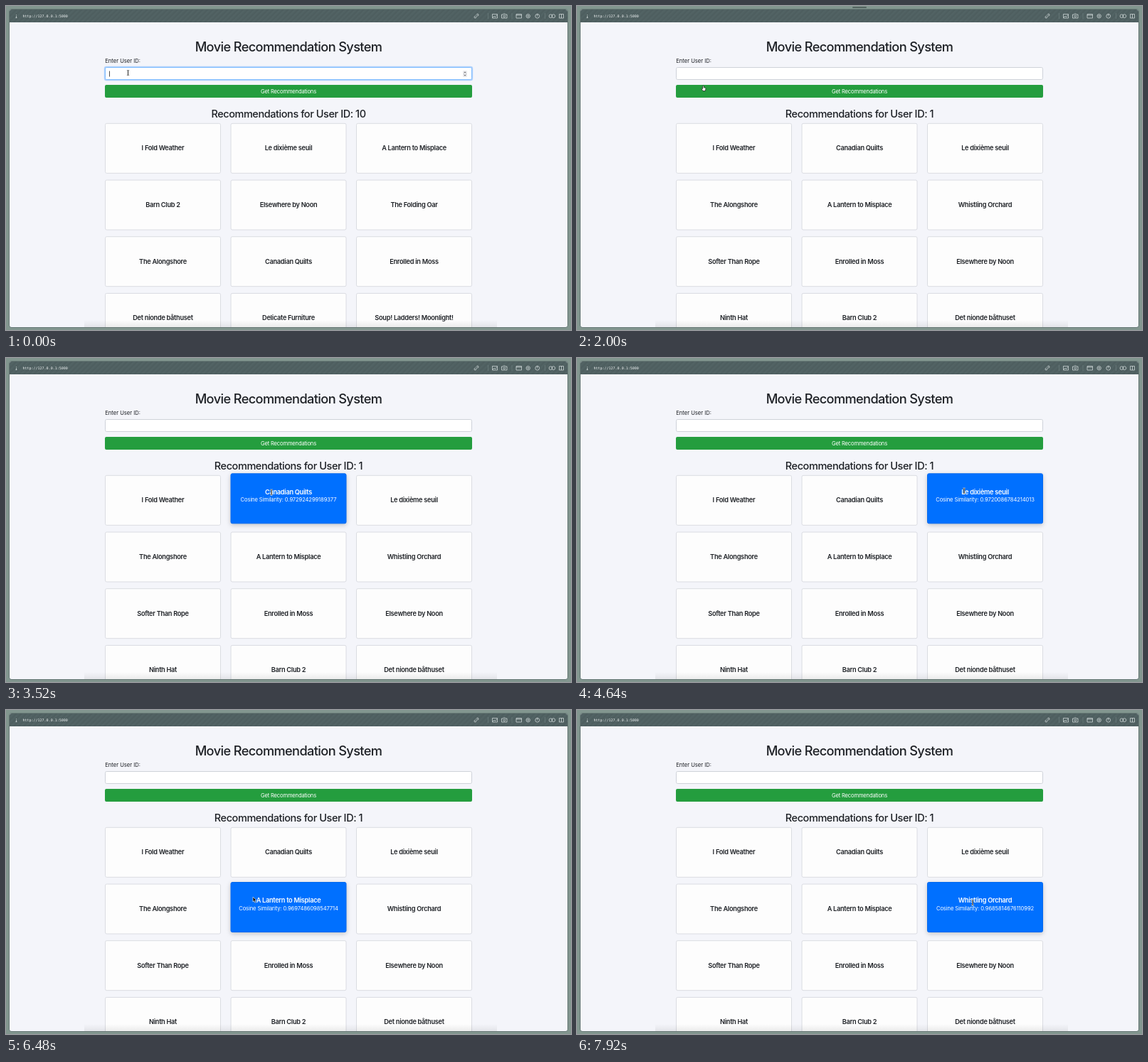
Recreate the animation shown at these times as an HTML page. Size 794 px wide and 456 px high, loop 8 s.

```html
<!DOCTYPE html>
<html lang="en">
<head>
<meta charset="utf-8">
<title>Movie Recommendation System</title>
<style>
html, body { margin: 0; width: 100%; height: 100%; overflow: hidden; background: #82968f; }
svg { display: block; width: 794px; height: 456px; }
text { font: 400 7.6px Inter, "Open Sans", sans-serif; fill: #1d2025; white-space: pre; }
.mid { text-anchor: middle; }
.h1 { font-size: 18.2px; font-weight: 500; letter-spacing: -.034em; }
.h2 { font-size: 14.5px; font-weight: 500; letter-spacing: -.03em; }
.card { font-size: 9.2px; font-weight: 600; letter-spacing: -.03em; }
.sim { letter-spacing: -.014em; }
.button { letter-spacing: -.023em; }
.white { fill: #fff; }
.url { font: 5px "DejaVu Sans Mono", monospace; fill: #f0f3f3; }
.icons { fill: none; stroke: #dfe6e5; stroke-width: .7; }
.lift { filter: drop-shadow(0 2px 3px rgba(0, 0, 0, .2)); }
</style>
</head>
<body>
<svg viewBox="0 0 794 456">
  <defs>
    <pattern id="stripes" width="5" height="5" patternUnits="userSpaceOnUse" patternTransform="rotate(45)">
      <rect width="5" height="5" fill="#4e5e5f"/><rect width="2.5" height="5" fill="#526364"/>
    </pattern>
    <linearGradient id="fade" x2="0" y2="1">
      <stop stop-opacity="0"/><stop offset="1" stop-opacity=".07"/>
    </linearGradient>
    <clipPath id="window"><rect x="5" y="5" width="784" height="447" rx="3"/></clipPath>
  </defs>
  <rect width="794" height="456" fill="#82968f"/>
  <rect x="4.5" y="4.5" width="785" height="448" rx="3.5" fill="none" stroke="#647673"/>
  <g clip-path="url(#window)">
    <rect x="5" y="5" width="784" height="447" fill="#f4f5fa"/>
    <rect x="5" y="5" width="784" height="18" fill="url(#stripes)"/>
    <text class="url" x="23.5" y="15.8">http://127.0.0.1:5000</text>
    <g class="icons">
      <path d="M14.5 12.2v.8m0 .8v3M13.5 16.6h2"/>
      <path d="M660 15.6l3-3M660.6 12.6l1.2-1.2q2-1 2.4 1.4l-1.4 1.6M661.4 15.6l-1.4 1.4q-2 .6-2-1.8l1.6-1.6"/>
      <path d="M677.5 10v8M711 10v8M757.5 10v8" stroke="#6f8080"/>
      <path d="M683.5 11.5h7v5.5h-7zM684 16l2-2 1.5 1.5 2.5-3M696.5 12h2l.8-1h2l.8 1h1.9v5h-7.5z"/>
      <circle cx="700.3" cy="14.3" r="1.4"/>
      <path d="M717 11.5h7.5v5.5h-7.5zM717 13h7.5"/>
      <circle cx="733.7" cy="14.2" r="2.7"/><circle cx="733.7" cy="14.2" r="1"/>
      <circle cx="746.7" cy="14.2" r="2.9"/><path d="M746.7 11v3.5"/>
      <circle cx="765.5" cy="14.2" r="2.4"/><circle cx="769.3" cy="14.2" r="2.4"/>
      <path d="M777.5 11.5h6v5.5h-6zM780.5 11.5v5.5"/>
    </g>
    <text class="h1 mid" x="397" y="63.5">Movie Recommendation System</text>
    <text x="139.3" y="79.7">Enter User ID:</text>
    <g id="page"></g>
    <rect x="110" y="442" width="580" height="10" fill="url(#fade)"/>
  </g>
  <g id="overlay"></g>
</svg>
<script>
const LOOP = 8000, SUBMIT = 1520;
const page = document.getElementById('page'), overlay = document.getElementById('overlay');

const before = ['I Fold Weather', 'Le dixième seuil', 'A Lantern to Misplace', 'Barn Club 2',
  'Elsewhere by Noon', 'The Folding Oar', 'The Alongshore', 'Canadian Quilts', 'Enrolled in Moss',
  'Det nionde båthuset', 'Delicate Furniture', 'Soup! Ladders! Moonlight!'];
const after = ['I Fold Weather', 'Canadian Quilts', 'Le dixième seuil', 'The Alongshore',
  'A Lantern to Misplace', 'Whistling Orchard', 'Softer Than Rope', 'Enrolled in Moss',
  'Elsewhere by Noon', 'Ninth Hat', 'Barn Club 2', 'Det nionde båthuset'];

// Hover span and score of the first six result cards
const hovers = [
  [2640, 3190, '0.9743157820146523'], [3210, 4130, '0.972924299189377'],
  [4200, 4850, '0.9720086784214013'], [4970, 5770, '0.9714541503111487'],
  [5850, 6650, '0.9697486098547714'], [6740, 9000, '0.9685814676110992']];

// Pointer stops: time, x, y, shape
const path = [
  [0, 171.5, 94, 'beam'], [160, 171.5, 94, 'beam'], [400, 175, 110, 'hand'], [480, 176, 114, 'hand'],
  [800, 176, 114, 'hand'], [1200, 178, 116, 'hand'], [2320, 178, 116, 'hand'], [2520, 186, 132, 'arrow'],
  [2820, 205, 189, 'beam'], [3120, 216, 190, 'beam'], [3160, 216, 190, 'arrow'], [3300, 362, 189, 'beam'],
  [3520, 373, 189, 'beam'], [3760, 395, 188, 'beam'], [4080, 400, 188, 'arrow'], [4300, 537, 187, 'beam'],
  [4640, 544, 187, 'beam'], [4800, 544, 187, 'arrow'], [5000, 292, 243, 'arrow'], [5200, 245.5, 255, 'arrow'],
  [5500, 216, 268, 'beam'], [5680, 216, 268, 'arrow'], [5920, 328, 267, 'arrow'], [6480, 349, 267, 'arrow'],
  [6560, 349, 267, 'arrow'], [6820, 542, 270, 'beam'], [7360, 553, 271, 'beam'], [7920, 556, 271, 'beam'],
  [LOOP, 556, 271, 'beam']];

const stem = 'M-1.5 -3.5q1.5 0 1.5 1v5q0 1 1.5 1M1.5 -3.5q-1.5 0-1.5 1v5q0 1-1.5 1';
const shapes = {
  beam: `<path d="${stem}" fill="none" stroke="#fff" stroke-width="2"/>`
    + `<path d="${stem}" fill="none" stroke="#111" stroke-width=".7"/>`,
  arrow: '<path d="M-2 -4v7l1.6-1.4 1.2 2.6 1.3-.6-1.2-2.5h2.2z" fill="#111" stroke="#fff" stroke-width=".6"/>',
  hand: '<path d="M-1.3 -3.5q1-1 1.5 0v2.2l2 .4q1 .4.7 1.8l-.7 2.7h-3.2l-2-2.8q0-1.2 1.7-.3z" fill="#fff" stroke="#111" stroke-width=".7"/>'
};

const clamp = v => Math.min(1, Math.max(0, v));
const ease = v => 1 - (1 - clamp(v)) ** 2;
const pulse = (t, start, end, span) => ease((t - start) / span) * (1 - ease((t - end) / span));
const mix = (a, b, k) => `rgb(${a.map((v, i) => Math.round(v + (b[i] - v) * k))})`;
const text = (cls, x, y, s) => `<text class="${cls}" x="${x}" y="${y}">${s}</text>`;
const box = (x, y, w, h, fill, stroke, more = '') =>
  `<rect x="${x}" y="${y}" width="${w}" height="${h}" rx="2" fill="${fill}" stroke="${stroke}" ${more}/>`;

function form(t) {
  const focus = 1 - ease((t - 840) / 160);
  const press = pulse(t, 840, 1440, 150), dark = Math.max(press, pulse(t, 2340, 2500, 100));
  const green = mix([36, 157, 62], [33, 136, 56], dark);
  let out = box(139, 86, 516, 18, 'none', '#1a80ff', `stroke-width="2.5" opacity="${.3 * focus}"`)
    + box(139.5, 86.5, 515, 17, '#fff', mix([206, 210, 217], [128, 189, 255], focus));
  if (t >= 320 && t < SUBMIT) out += text('', 145, 97.8, '1');
  if (t < 840 && t % 1000 < 500) out += `<path d="M${t < 320 ? 145.5 : 149.5} 91.5v8" stroke="#222" stroke-width=".8"/>`;
  if (t < 400) out += '<rect x="642" y="91" width="6" height="9" rx="1" fill="#e9eaed"/>'
    + '<path d="M643.7 94.3l1.3-1.5 1.3 1.5M643.7 96.7l1.3 1.5 1.3-1.5" fill="none" stroke="#444" stroke-width=".8"/>';
  return out
    + box(139, 111, 516, 18, 'none', '#28a745', `stroke-width="2.8" opacity="${.5 * press}"`)
    + box(139, 111, 516, 18, green, 'none')
    + text('button white mid', 397, 122.9, 'Get Recommendations');
}

function card(title, i, t) {
  const x = 139.5 + i % 3 * 176.5, y = 165.3 + Math.floor(i / 3) * 79.7, cx = x + 81;
  const [start, end, score] = t >= SUBMIT && hovers[i] || [1e5, 2e5];
  const k = pulse(t, start, end, 300), on = t >= start && t < end;
  const shown = mix([29, 32, 37], [255, 255, 255], k);
  const body = box(x, y, 162, 70, mix([253, 253, 253], [0, 112, 255], k), mix([218, 220, 226], [0, 104, 238], k))
    + `<text class="card mid" x="${cx}" y="${y + (on ? 28.9 : 37.9)}" style="fill:${shown}">${title}</text>`
    + (on ? text('sim white mid', cx, y + 39.3, 'Cosine Similarity: ' + score) : '');
  return `<g ${k > 0 ? 'class="lift"' : ''} transform="translate(0 ${-2.5 * k})">${body}</g>`;
}

function pointer(t) {
  const n = path.findIndex(p => p[0] > t), [t0, x0, y0, shape] = path[n - 1], [t1, x1, y1] = path[n];
  const k = (t - t0) / (t1 - t0);
  return `<g transform="translate(${x0 + (x1 - x0) * k} ${y0 + (y1 - y0) * k})">${shapes[shape]}</g>`;
}

function draw(now) {
  const t = now % LOOP, loaded = t >= SUBMIT;
  page.innerHTML = form(t)
    + text('h2 mid', 397, 157.2, 'Recommendations for User ID: ' + (loaded ? 1 : 10))
    + (loaded ? after : before).map((title, i) => card(title, i, t)).join('');
  overlay.innerHTML = `<rect x="387" y="1" width="20" height="2" rx="1" fill="#53625f" opacity="${pulse(t, 1600, 2040, 120)}"/>`
    + pointer(t);
}

let begin;
function tick(now) {
  begin ??= now;
  draw(now - begin);
  requestAnimationFrame(tick);
}
requestAnimationFrame(tick);
</script>
</body>
</html>
```
